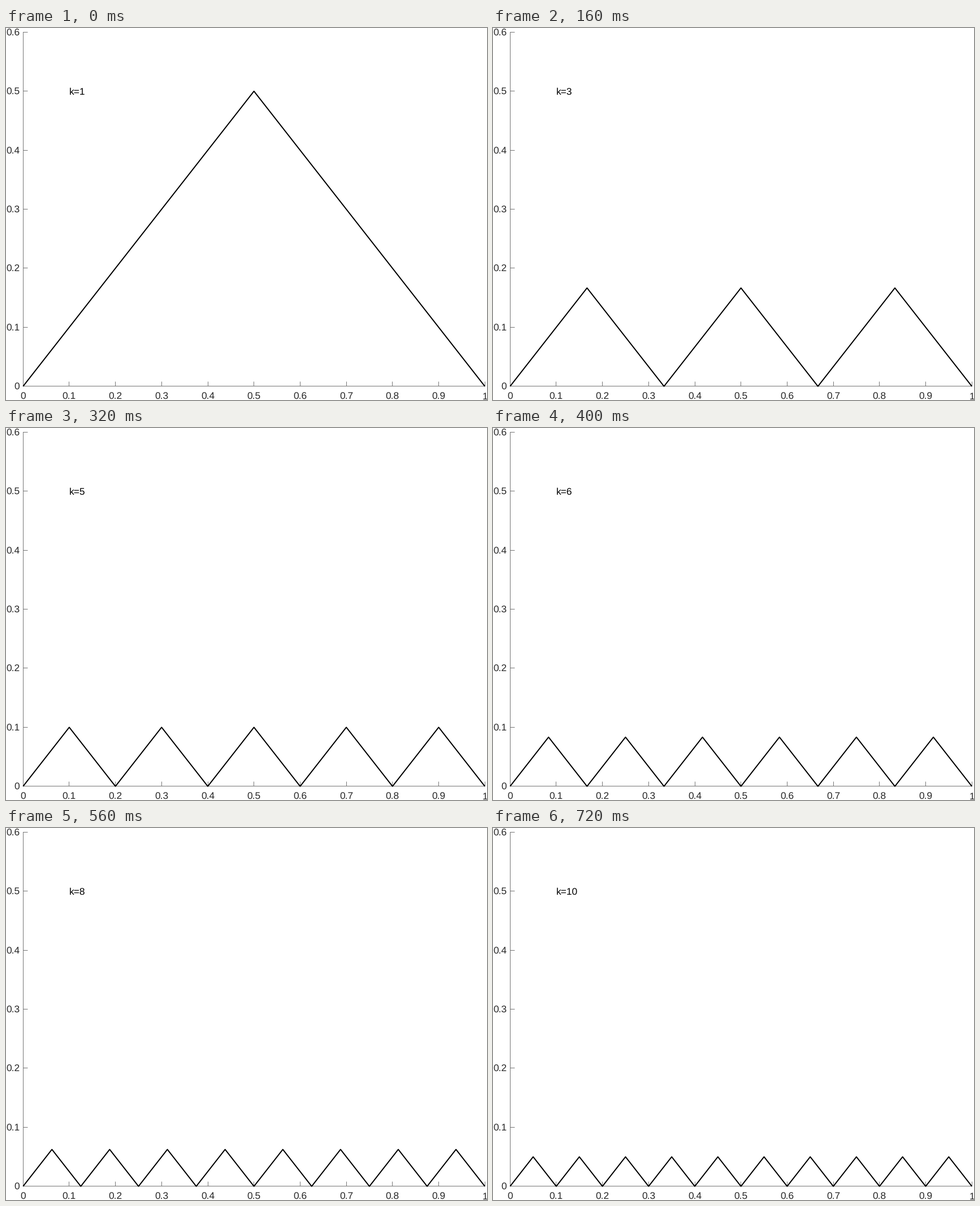
A matplotlib script that plays this animation: 851 by 658 pixels, repeating every 0.8 s.

```python
import numpy as np
import matplotlib.pyplot as plt
from matplotlib.animation import FuncAnimation

W, H, DPI = 851, 658, 64
LEFT, RIGHT, BASE = 30.2, 847.2, 633.8
UNIT_Y = 1044.0
TICK = 8
GREY, LABEL = "#757575", "#262626"


def pt(px):
    return px * 72 / DPI


def px_x(x):
    return LEFT + (RIGHT - LEFT) * x


def px_y(y):
    return BASE - UNIT_Y * y


def mid(v):
    """Centre of the pixel that holds v."""
    return np.floor(v) + 0.5


plt.rcParams["font.family"] = "Liberation Sans"
plt.rcParams["text.hinting"] = "none"
fig = plt.figure(figsize=(W / DPI, H / DPI), dpi=DPI, facecolor="white")
ax = fig.add_axes([0, 0, 1, 1])
ax.set_xlim(0, W)
ax.set_ylim(H, 0)
ax.axis("off")


def rule(xs, ys):
    ax.plot(xs, ys, color=GREY, lw=pt(1), solid_capstyle="butt", snap=False)


def label(x, y, text, ha, color=LABEL):
    return ax.text(x, y, text, ha=ha, va="baseline", color=color,
                   fontsize=pt(17.4))


# Axes with inward ticks
x0, y0 = mid(LEFT), mid(BASE)
rule([x0, mid(RIGHT) + 0.5], [y0, y0])
rule([x0, x0], [y0, mid(px_y(0.6)) - 0.5])
for i in range(11):
    x = mid(px_x(i / 10))
    rule([x, x], [y0, y0 - TICK])
    label(x, 657, f"{i / 10:g}", "center")
for i in range(7):
    y = mid(px_y(i / 10))
    rule([x0, x0 + TICK], [y, y])
    label(24, y + 6.7, f"{i / 10:g}", "right")

wave, = ax.plot([], [], color="black", lw=pt(2), solid_joinstyle="round",
                solid_capstyle="butt", zorder=3)
caption = label(112, 118, "", "left", "black")


def update(frame):
    k = frame + 1
    n = np.arange(2 * k + 1)
    wave.set_data(px_x(n / (2 * k)), px_y((n % 2) / (2 * k)))
    caption.set_text(f"k={k}")
    return wave, caption


anim = FuncAnimation(fig, update, frames=10, interval=80, repeat=True,
                     repeat_delay=0)
plt.show()
```
